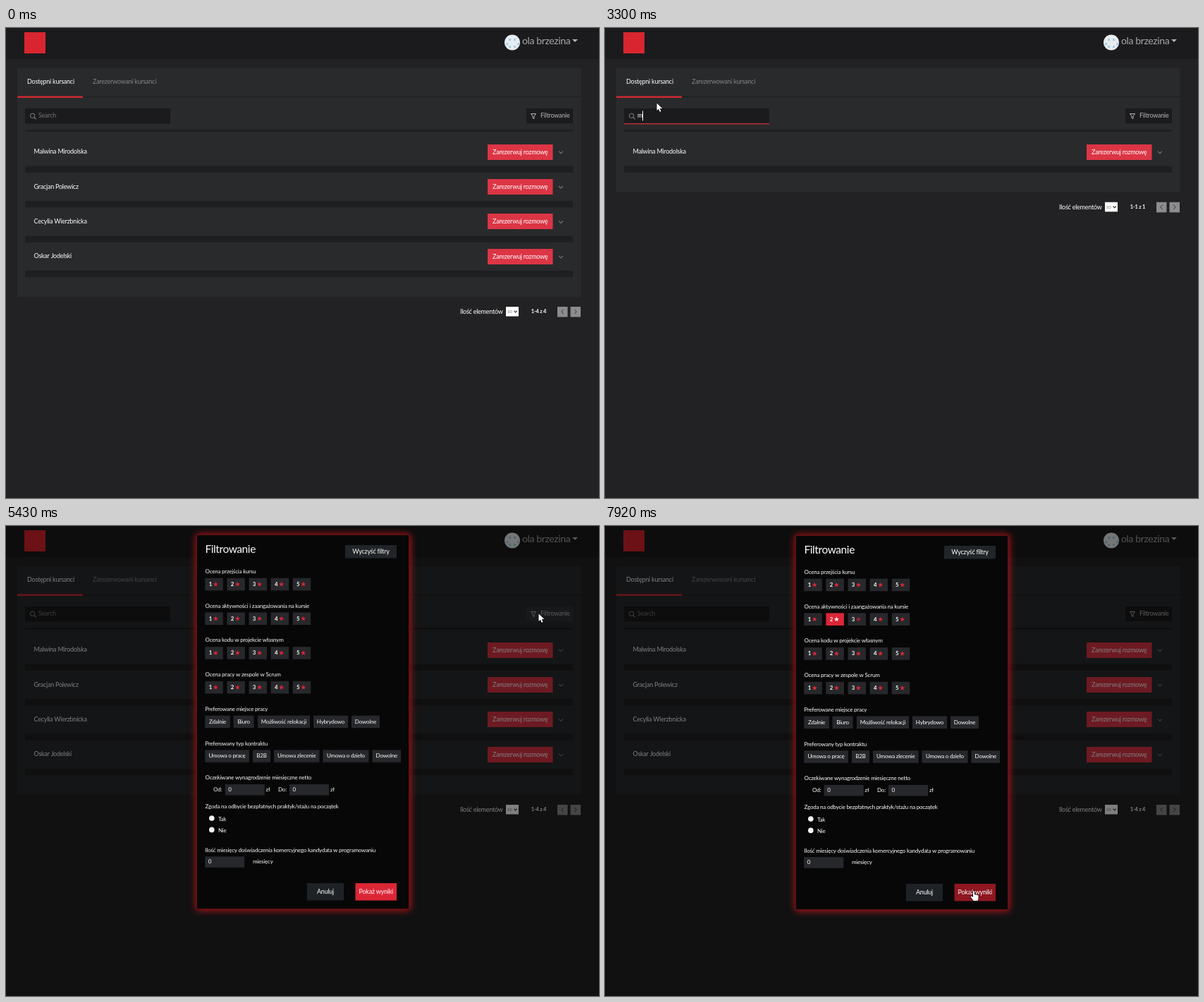
These frames come from a looping animation (841 px wide and 666 px high, 8 s). An HTML page with a canvas:

```html
<!DOCTYPE html>
<html lang="pl">
<head>
<meta charset="utf-8">
<title>Kursanci</title>
<style>
html, body { margin: 0; width: 100%; height: 100%; overflow: hidden; background: #222224; }
canvas { display: block; }
</style>
</head>
<body>
<canvas id="stage" width="841" height="666"></canvas>
<script>
const W = 841, H = 666, LOOP = 8000;
const stage = document.getElementById('stage').getContext('2d');
const layer = document.createElement('canvas');
layer.width = W;
layer.height = H;
const sheet = layer.getContext('2d');
let c = stage;

const CARD = '#292a2c', DARK = '#1b1b1d', BAR = '#1e1f21', FIELD = '#27282b', RED = '#dc2636';
const PEOPLE = ['Malwina Mirodolska', 'Gracjan Polewicz', 'Cecylia Wierzbnicka', 'Oskar Jodelski'];
const HINTS = ['st', 'ola', 'asd', 'bda', 'lama', 'ko'];

// time, x, y of the pointer tip
const PATH = [
  [120, 765, 634], [280, 115, 157], [580, 115, 157], [760, 60, 66], [900, 20, 95],
  [1040, 62, 122], [1110, 69, 124], [1200, 70, 124], [1360, 73, 106], [4270, 73, 106],
  [4400, 222, 97], [4700, 520, 180], [4900, 740, 150], [5010, 755, 124], [5450, 755, 124],
  [5880, 362, 118], [5940, 362, 118], [6170, 325, 130], [7010, 325, 130], [7600, 548, 536],
  [7650, 548, 536], [7810, 521, 517], [8000, 521, 517]
];

const ARROW = new Path2D('M0 0V10.6L2.5 8.3 4.2 12.2 6 11.4 4.3 7.6H7.8Z');
const HAND = new Path2D('M0 1q0-1.2 1-1.2t1 1.2V5q1.3-.8 2 .2 1.2-.6 1.9 .4 1.5-.4 1.6 1.2V10q0 2-1.2 3.5H.5Q-1 11-3.3 8.2q-.2-1.4 1.2-1.2L0 8.6Z');

const ramp = (t, a, b) => Math.min(1, Math.max(0, (t - a) / (b - a)));
const mix = (a, b, k) => `rgb(${a.map((v, i) => Math.round(v + (b[i] - v) * k))})`;

function box(x, y, w, h, color) {
  c.fillStyle = color;
  c.fillRect(x, y, w, h);
}

function setFont(size, weight = 400, family = 'Lato') {
  c.font = `${weight} ${size}px ${family}, sans-serif`;
  c.letterSpacing = family === 'Lato' ? `${-size * 0.027}px` : '0px';
}

// y is the visual middle of the line
function text(str, x, y, size = 9, color = '#fff', align = 'left', weight = 400, family = 'Lato') {
  setFont(size, weight, family);
  c.textAlign = align;
  c.fillStyle = color;
  c.fillText(str, x, y + size * 0.33);
}

function line(points, color, width = 1, close = false) {
  c.beginPath();
  points.forEach(([x, y]) => c.lineTo(x, y));
  if (close) c.closePath();
  c.strokeStyle = color;
  c.lineWidth = width;
  c.stroke();
}

function shape(points, color) {
  c.beginPath();
  points.forEach(([x, y]) => c.lineTo(x, y));
  c.fillStyle = color;
  c.fill();
}

function disc(x, y, r, color) {
  c.beginPath();
  c.arc(x, y, r, 0, Math.PI * 2);
  c.fillStyle = color;
  c.fill();
}

function star(x, y, r, color) {
  const pts = [];
  for (let i = 0; i < 10; i++) {
    const a = i * Math.PI / 5 - Math.PI / 2, d = i % 2 ? r * 0.45 : r;
    pts.push([x + Math.cos(a) * d, y + Math.sin(a) * d]);
  }
  shape(pts, color);
}

function button(x, y, w, h, label, bg, size = 9, color = '#fff') {
  box(x, y, w, h, bg);
  text(label, x + w / 2, y + h / 2 - 0.3, size, color, 'center');
}

function header() {
  box(0, 0, W, 44, DARK);
  box(26, 6, 30, 30, '#d9252f');
  disc(718, 20.5, 11, '#e9edf0');
  for (const [x, y] of [[713, 15], [720, 15], [709, 21], [725, 21], [713, 25], [720, 25]])
    box(x, y, 3.2, 3.2, '#a9cfe6');
  text('ola brzezina', 732, 18.7, 14, '#a9a9ab');
  shape([[803, 16], [811, 16], [807, 20]], '#b0b0b2');
}

function searchField(t) {
  const value = t < 2100 ? '' : t < 2350 ? 'm' : t < 3300 ? 'ma' : t < 3630 ? 'm' : '';
  box(27, 114, 206, 21.5, DARK);
  c.beginPath();
  c.arc(37.6, 124.3, 3.2, 0, 7);
  c.strokeStyle = '#858588';
  c.lineWidth = 1;
  c.stroke();
  line([[40, 126.7], [42.6, 129.3]], '#858588', 1.2);
  text(value || 'Search', 46, 124.3, 9, value ? '#fff' : '#737376');

  c.globalAlpha = ramp(t, 1110, 1270) * (1 - ramp(t, 5090, 5250));
  box(27, 135, 206, 1.3, '#cf2d35');
  c.globalAlpha = 1;

  const hidden = [[1640, 2100], [2890, 3300], [3940, 4470], [5000, 5090]].some(([a, b]) => t >= a && t < b);
  if (t >= 1110 && t < 5090 && !hidden) {
    setFont(9);
    box(Math.round(46 + c.measureText(value).width), 117.5, 1, 14, '#fff');
  }
}

function filterButton(t) {
  box(738, 114, 66, 21, t > 4960 && t < 5480 ? '#313335' : DARK);
  line([[744.5, 121.5], [751.5, 121.5], [749, 125], [749, 128.5], [747, 127.5], [747, 125]], '#b5b5b8', 1, true);
  text('Filtrowanie', 758, 124.3, 9, '#b5b5b8');
}

function list(count) {
  box(27, 144, 777, 3, BAR);
  for (let i = 0; i < count; i++) {
    const y = 175.6 + i * 49.4;
    text(PEOPLE[i], 39.5, y - 0.3);
    button(683, Math.round(y - 11), 92.5, 22, 'Zarezerwuj rozmowę', '#dc3545');
    line([[784, y - 1], [787, y + 2], [790, y - 1]], '#7b7b7e', 1.1);
    box(27, y + 20, 777, 9.3, BAR);
  }
}

function pager(count) {
  const y = 402 - (4 - count) * 49.4;
  text('Ilość elementów', 644, y);
  box(709, y - 7, 18, 13.5, '#fff');
  text('10', 710.5, y - 0.2, 6.5, '#8a7a70');
  line([[720.5, y - 1.3], [722.7, y + 0.9], [724.9, y - 1.3]], '#333', 1.1);
  text(`1-${count} z ${count}`, 755.5, y, 7.5, '#fff', 'center', 700);
  [[782, 1], [800.5, -1]].forEach(([x, d]) => {
    box(x, y - 7, 14.5, 14.5, '#8c8c8d');
    const m = x + 7.2;
    line([[m + d * 1.5, y - 3], [m - d * 1.5, y], [m + d * 1.5, y + 3]], '#333', 1);
  });
}

function hints(t) {
  const shown = ramp(t, 1110, 1190) * (1 - ramp(t, 2100, 2300));
  if (!shown) return;
  const k = 0.95 + 0.05 * shown;
  c.save();
  c.globalAlpha = shown;
  c.translate(102, 211);
  c.scale(k, k);
  c.translate(-102, -211);
  c.beginPath();
  c.roundRect(89, 141, 38, 140, 3);
  c.moveTo(97, 141);
  c.lineTo(102, 136);
  c.lineTo(107, 141);
  c.fillStyle = '#fff';
  c.fill();
  HINTS.forEach((h, i) => text(h, 96.7, 155.5 + i * 22.4, 7.6, '#444', 'left', 400, 'Open Sans'));
  c.restore();
}

function page(t) {
  const count = t >= 2100 && t < 3630 ? 1 : 4;
  box(0, 0, W, H, '#222224');
  header();
  box(16, 57, 799.5, 324 - (4 - count) * 49.4, CARD);
  box(16, 97, 799.5, 1.2, BAR);
  box(16, 96.5, 93, 2.5, '#cb2a30');
  text('Dostępni kursanci', 30, 75.6);
  text('Zarezerwowani kursanci', 123, 75.6, 9, '#85858a');
  searchField(t);
  filterButton(t);
  list(count);
  pager(count);
  hints(t);
}

function ratings(row, y, t) {
  for (let n = 1; n <= 5; n++) {
    const x = 282.3 + (n - 1) * 31.1;
    const picked = row === 1 && n === 2 && t >= 7010;
    const dim = row === 1 && t >= 5940 && (n === 3 || n === 2);
    box(x, y - 8.8, 25.5, 17.6, picked ? RED : FIELD);
    text(String(n), x + 7.5, y, 7.8, '#fff', 'center', 700);
    star(x + 15, y, 3.6, picked ? '#fff' : dim ? '#ae202d' : RED);
  }
}

function chips(y, items) {
  items.forEach(([label, x, w]) => button(x, y - 8.8, w, 17.6, label, FIELD, 8));
}

function field(x, y) {
  box(x, y - 7.8, 56, 15.6, FIELD);
  text('0', x + 4.5, y - 0.2, 8);
}

function modal(t) {
  c.clearRect(0, 0, W, H);
  c.save();
  c.shadowColor = '#c8161c';
  c.shadowBlur = 10;
  box(269.5, 12.5, 303, 532, '#5f1012');
  c.restore();
  box(271, 14, 300, 529, '#070708');

  text('Filtrowanie', 282.5, 34, 15.5);
  button(481, 28, 73, 18.5, 'Wyczyść filtry', '#212529');

  ['Ocena przejścia kursu', 'Ocena aktywności i zaangażowania na kursie',
    'Ocena kodu w projekcie własnym', 'Ocena pracy w zespole w Scrum'].forEach((label, i) => {
    text(label, 282.5, 65.3 + i * 48.7, 8);
    ratings(i, 83.5 + i * 48.7, t);
  });

  text('Preferowane miejsce pracy', 282.5, 260.2, 8);
  chips(278.3, [['Zdalnie', 282.3, 35.5], ['Biuro', 322.5, 29], ['Możliwość relokacji', 357, 74],
    ['Hybrydowo', 436, 49], ['Dowolne', 490, 40]]);
  text('Preferowany typ kontraktu', 282.5, 309, 8);
  chips(327, [['Umowa o pracę', 282.3, 62.5], ['B2B', 350, 25], ['Umowa zlecenie', 380, 64.5],
    ['Umowa o dzieło', 449.5, 65], ['Dowolne', 519.5, 40.5]]);

  text('Oczekiwane wynagrodzenie miesięczne netto', 282.5, 357.5, 8);
  text('Od:', 294, 374.3, 8);
  field(310.7, 374.7);
  text('zł', 368.5, 374.3, 8);
  text('Do:', 386, 374.3, 8);
  field(402, 374.7);
  text('zł', 460, 374.3, 8);

  text('Zgoda na odbycie bezpłatnych praktyk/stażu na początek', 282.5, 398.7, 8);
  ['Tak', 'Nie'].forEach((label, i) => {
    disc(291.8, 415 + i * 16.4, 3.8, '#f4f4f4');
    text(label, 301, 416 + i * 16.4, 8);
  });

  text('Ilość miesięcy doświadczenia komercyjnego kandydata w programowaniu', 282.5, 460, 8);
  field(282.3, 477);
  text('miesięcy', 350, 476.3, 8);

  button(427, 507, 52, 24.5, 'Anuluj', '#1e2226');
  button(495.5, 507, 58.5, 24.5, 'Pokaż wyniki', mix([220, 38, 54], [143, 23, 32], ramp(t, 7770, 7920)));
}

function showModal(t) {
  const fade = ramp(t, 5180, 5390);
  if (!fade) return;
  const slide = 50 * (1 - ramp(t, 5180, 5480)) ** 2.2;
  c = sheet;
  modal(t);
  c = stage;
  box(0, 0, W, H, `rgba(0,0,0,${0.5 * fade})`);
  c.globalAlpha = fade;
  c.drawImage(layer, 0, -slide * Math.pow(300 / 300, 1));
  c.globalAlpha = 1;
}

function pointer(t) {
  if (t < PATH[0][0]) return;
  const i = Math.max(1, PATH.findIndex(p => p[0] >= t));
  const [t0, x0, y0] = PATH[i - 1], [t1, x1, y1] = PATH[i];
  const k = ramp(t, t0, t1);
  const x = x0 + (x1 - x0) * k, y = y0 + (y1 - y0) * k;

  if (t < 5090 && x > 27 && x < 233 && y > 114 && y < 136) {
    const beam = [[x - 2, y - 5], [x, y - 4.5], [x, y + 4.5], [x - 2, y + 5]];
    line(beam, '#e8e8e8', 1);
    line([[x + 2, y - 5], [x, y - 4.5], [x, y + 4.5], [x + 2, y + 5]], '#e8e8e8', 1);
    return;
  }
  const hand = (t > 5960 && t < 7060) || t > 7720;
  c.save();
  c.translate(x + (hand ? 1 : 0.5), y + 0.5);
  c.lineJoin = 'round';
  c.lineWidth = 1.4;
  c.strokeStyle = '#111';
  c.fillStyle = '#fff';
  c.stroke(hand ? HAND : ARROW);
  c.fill(hand ? HAND : ARROW);
  c.restore();
}

const start = performance.now();
function frame() {
  const t = (performance.now() - start) % LOOP;
  page(t);
  showModal(t);
  pointer(t);
  requestAnimationFrame(frame);
}
frame();
</script>
</body>
</html>
```
